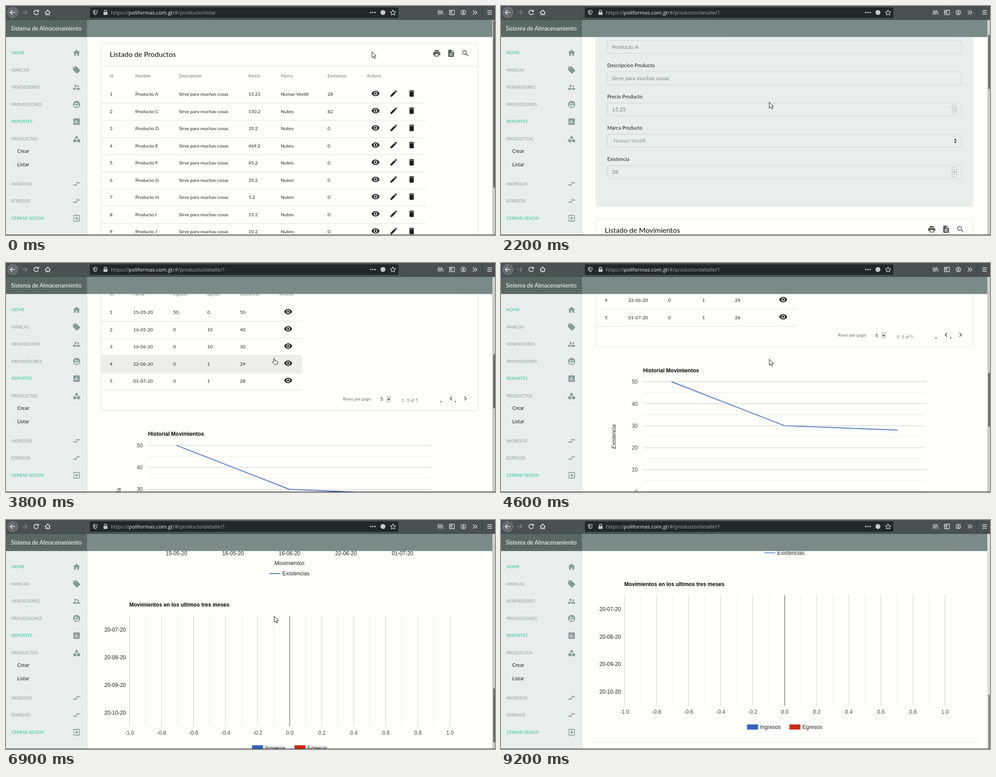
These frames come from a looping animation (1091 px wide and 513 px high, 9300 ms). An HTML page:

```html
<!DOCTYPE html>
<html lang="es">
<head>
<meta charset="utf-8">
<title>Sistema de Almacenamiento</title>
<style>
  html, body { margin: 0; width: 100%; height: 100%; overflow: hidden; background: #fffffb; }
  svg { display: block; width: 100vw; height: 100vh; font-family: Lato, sans-serif; }
  .ui { font-family: "Open Sans", sans-serif; }
  .chart { font-family: "Liberation Sans", Arial, sans-serif; }
</style>
</head>
<body>
<svg id="stage" viewBox="0 0 1091 513" preserveAspectRatio="none"></svg>
<script>
const LOOP = 9300, STEP = 100;
const INK = '#1d2120', MUTE = '#8c9c98', TEAL = '#2fc29b', FORM = '#e9eeec', EDGE = '#dadcd9';
const BLUE = '#3864bf', RED = '#cc2a14';

const ICON = {
  home: 'M10 20v-6h4v6h5v-8h3L12 3 2 12h3v8z',
  tag: 'M21.41 11.58l-9-9C12.05 2.22 11.55 2 11 2H4c-1.1 0-2 .9-2 2v7c0 .55.22 1.05.59 1.42l9 9c.36.36.86.58 1.41.58.55 0 1.05-.22 1.41-.59l7-7c.37-.36.59-.86.59-1.41 0-.55-.23-1.06-.59-1.42zM5.5 7C4.67 7 4 6.33 4 5.5S4.67 4 5.5 4 7 4.67 7 5.5 6.33 7 5.5 7z',
  people: 'M16.5 12a2.5 2.5 0 1 0 0-5a2.5 2.5 0 0 0 0 5zM9 11a3 3 0 1 0 0-6a3 3 0 0 0 0 6zm7.5 3c-1.83 0-5.5.92-5.5 2.75V19h11v-2.25c0-1.83-3.67-2.75-5.5-2.75zM9 13c-2.33 0-7 1.17-7 3.5V19h7v-2.25c0-.85.33-2.34 2.37-3.47C10.5 13.1 9.66 13 9 13z',
  group: 'M12 2a10 10 0 1 0 0 20a10 10 0 0 0 0-20zm3.6 6.34a1.93 1.93 0 1 1 0 3.86a1.93 1.93 0 0 1 0-3.86zm-6-1.58a2.36 2.36 0 1 1 0 4.72a2.36 2.36 0 0 1 0-4.72zm0 9.13v3.75c-2.4-.75-4.3-2.6-5.14-4.96 1.05-1.12 3.67-1.69 5.14-1.69.53 0 1.2.08 1.9.22-1.64.87-1.9 2.02-1.9 2.68zM12 20l-.8-.04v-4.07c0-1.42 2.94-2.13 4.4-2.13 1.07 0 2.92.39 3.84 1.15C18.27 17.88 15.38 20 12 20z',
  bars: 'M19 3H5c-1.1 0-2 .9-2 2v14c0 1.1.9 2 2 2h14c1.1 0 2-.9 2-2V5c0-1.1-.9-2-2-2zM9 17H7v-7h2v7zm4 0h-2V7h2v10zm4 0h-2v-4h2v4z',
  shapes: 'M12 2l-5.5 9h11zM17.5 13a4.5 4.5 0 1 0 0 9a4.5 4.5 0 0 0 0-9zM3 13.5h8v8H3z',
  swap: 'M9.01 14H2v2h7.01v3L13 15l-3.99-4v3zm5.98-1v-3H22V8h-7.01V5L11 9l3.99 4z',
  exit: 'M10.09 15.59L11.5 17l5-5-5-5-1.41 1.41L12.67 11H3v2h9.67l-2.58 2.59zM19 3H5c-1.11 0-2 .9-2 2v4h2V5h14v14H5v-4H3v4c0 1.1.89 2 2 2h14c1.1 0 2-.9 2-2V5c0-1.1-.9-2-2-2z',
  eye: 'M12 4.5C7 4.5 2.73 7.61 1 12c1.73 4.39 6 7.5 11 7.5s9.27-3.11 11-7.5c-1.73-4.39-6-7.5-11-7.5zM12 17a5 5 0 1 1 0-10a5 5 0 0 1 0 10zm0-8a3 3 0 1 0 0 6a3 3 0 0 0 0-6z',
  pen: 'M3 17.25V21h3.75L17.81 9.94l-3.75-3.75L3 17.25zM20.71 7.04c.39-.39.39-1.02 0-1.41l-2.34-2.34c-.39-.39-1.02-.39-1.41 0l-1.83 1.83 3.75 3.75 1.83-1.83z',
  bin: 'M6 19c0 1.1.9 2 2 2h8c1.1 0 2-.9 2-2V7H6v12zM19 4h-3.5l-1-1h-5l-1 1H5v2h14V4z',
  print: 'M19 8H5c-1.66 0-3 1.34-3 3v6h4v4h12v-4h4v-6c0-1.66-1.34-3-3-3zm-3 11H8v-5h8v5zm3-7a1 1 0 1 1 0-2a1 1 0 0 1 0 2zm-1-9H6v4h12V3z',
  doc: 'M14 2H6c-1.1 0-2 .9-2 2v16c0 1.1.9 2 2 2h12c1.1 0 2-.9 2-2V8l-6-6zm2 16H8v-2h8v2zm0-4H8v-2h8v2zm-3-5V3.5L18.5 9H13z',
  find: 'M15.5 14h-.79l-.28-.27A6.5 6.5 0 1 0 13.73 14.43l.27.28v.79l5 4.99L20.49 19l-4.99-5zm-6 0a4.5 4.5 0 1 1 0-9a4.5 4.5 0 0 1 0 9z',
  prev: 'M15.41 7.41L14 6l-6 6 6 6 1.41-1.41L10.83 12z',
  next: 'M10 6L8.59 7.41 13.17 12l-4.58 4.59L10 18l6-6z'
};

// x is the text edge, cy its optical middle
const text = (x, cy, s, size, fill = INK, extra = '') =>
  `<text x="${x}" y="${cy + size * .36}" font-size="${size}" fill="${fill}" ${extra}>${s}</text>`;
const rect = (x, y, w, h, fill, extra = '') =>
  `<rect x="${x}" y="${y}" width="${w}" height="${h}" fill="${fill}" ${extra}/>`;
const line = (x1, y1, x2, y2, c, w = 1) =>
  `<line x1="${x1}" y1="${y1}" x2="${x2}" y2="${y2}" stroke="${c}" stroke-width="${w}"/>`;
const icon = (name, cx, cy, fill = INK) =>
  `<path transform="translate(${cx - 9.6} ${cy - 9.6}) scale(.8)" fill="${fill}" d="${ICON[name]}"/>`;
const stroke = (d, c = '#d6d9d9', w = 1.5) =>
  `<path d="${d}" fill="none" stroke="${c}" stroke-width="${w}" stroke-linejoin="round"/>`;
const range = n => [...Array(n).keys()];
const MID = 'text-anchor="middle"', END = 'text-anchor="end"';

function toolbar() {
  const glyph = '#d6d9d9';
  return rect(0, 0, 1091, 31, '#4b5052') + rect(0, 30, 1091, 1, '#3c4143') +
    rect(187, 3, 688.5, 23.5, '#222729', 'rx="2"') +
    rect(56, 3, 23, 23, '#686d6f', 'rx="2" id="reload" visibility="hidden"') +
    `<circle cx="15" cy="14.5" r="11.5" fill="#64696b" stroke="#8b8f91"/>` +
    stroke('M20.5 14.5H10M14.5 9.5l-5 5 5 5', '#eceeee', 1.7) +
    stroke('M36 14.5h10.5M42 9.5l5 5-5 5', '#83888a', 1.6) +
    stroke('M71.3 11.2a5 5 0 1 0 .9 4.6M72.6 8.5v4h-4', '#e4e6e6', 1.7) +
    stroke('M87 15l6-6 6 6M89 14v5.5h8V14M93 19v-3', '#e4e6e6', 1.7) +
    stroke('M199 9.3l4.5 1.5c0 4.5-1.5 7.500-4.500 8.900c-3-1.400-4.500-4.400-4.500-8.900z', '#c3c6c7', 1.4) +
    `<path d="M199 11.300v6.300c-1.500-1.200-2.500-3-2.600-5.500z" fill="#c3c6c7"/>` +
    rect(217.5, 13.5, 9, 6.5, '#c3c6c7', 'rx="1"') + stroke('M219.300 14v-2a2.700 2.700 0 0 1 5.400 0v2', '#c3c6c7') +
    [813.5, 818.5, 823.5].map(x => `<circle cx="${x}" cy="14.5" r="1.6" fill="${glyph}"/>`).join('') +
    `<circle cx="841" cy="14.5" r="5.5" fill="#c6c9ca"/>` +
    stroke('M863.500 8.800l1.800 3.900 4.200.5-3.100 2.900.8 4.200-3.700-2.100-3.700 2.100.8-4.200-3.100-2.900 4.200-.5z', glyph, 1.3) +
    stroke('M964.500 9.500v10M967.500 9.500v10M970.500 9.500v10M972.500 10l3 9.500', glyph) +
    stroke('M989.500 9.500h11v10h-11zM994.500 9.500v10M990.500 12.500h3M990.500 15h3', glyph, 1.4) +
    `<circle cx="1020.500" cy="14.500" r="5.300" fill="none" stroke="${glyph}" stroke-width="1.300"/>` +
    `<circle cx="1020.500" cy="13" r="2" fill="${glyph}"/><path d="M1017 17.800a3.600 2.600 0 0 1 7 0z" fill="${glyph}"/>` +
    stroke('M1041.500 10l4.500 4.500-4.500 4.500M1046.500 10l4.500 4.500-4.500 4.500', glyph, 1.6) +
    line(1062.5, 0, 1062.5, 29, '#35393b') +
    stroke('M1074 10.500h10M1074 14.500h10M1074 18.500h10', '#e4e6e6', 1.6) +
    `<text class="ui" x="234" y="18.500" font-size="11.600" fill="#a4a9ab">https://<tspan fill="#f4f6f6">poliformas.com.gt</tspan>/#/producto/<tspan id="page"></tspan></text>`;
}

function sidebar() {
  const items = [
    ['HOME', 105, 'home', 1], ['MARCAS', 143.5, 'tag'], ['VENDEDORES', 182, 'people'],
    ['PROVEEDORES', 220.5, 'group'], ['REPORTES', 259, 'bars', 1], ['PRODUCTOS', 297.5, 'shapes'],
    ['INGRESOS', 398.5, 'swap'], ['EGRESOS', 437, 'swap'], ['CERRAR SESION', 475.5, 'exit', 1]
  ];
  return rect(0, 69, 180, 444, FORM) + line(180.5, 69, 180.5, 513, '#cfd6d3') +
    rect(0, 31, 180, 38.5, '#5a6863') + rect(180, 31, 905, 38.5, '#798a87') +
    line(180.5, 31, 180.5, 69.5, '#65746f') +
    text(11, 50, 'Sistema de Almacenamiento', 12.8, '#fff') +
    items.map(([s, y, ic, on]) => text(12, y, s, 9.6, on ? TEAL : MUTE) + icon(ic, 157.5, y, '#899995')).join('') +
    text(25, 325, 'Crear', 11.2) + text(25, 354.5, 'Listar', 11.2);
}

function card(y, h, title) {
  return rect(212, y, 841, h, 'none', `stroke="${EDGE}" rx="3.500"`) +
    text(231.5, y + 25, title, 16, '#0c0f0e') + line(212, y + 51.5, 1053, y + 51.5, EDGE) +
    ['print', 'doc', 'find'].map((n, i) => icon(n, 961 + 32 * i, y + 23, '#565b59')).join('');
}

function table(y, cols, heads, rows, right, icons, id) {
  const head = heads.map((h, i) => text(cols[i], y, h, 9.6, '#6c7270')).join('');
  return rect(212.5, y + 21.5, right - 212.5, 38.5, '#edeeea', `id="${id}" visibility="hidden"`) + head +
    rows.map((r, i) => {
      const cy = y + 40.5 + 38.5 * i;
      return r.map((c, j) => text(cols[j], cy, c, 10.4)).join('') +
        icons.map(([n, x]) => icon(n, x, cy - 1.5)).join('') +
        line(212, cy + 20, right, cy + 20, EDGE);
    }).join('');
}

function listPage() {
  const prices = ['15.23', '150.2', '35.2', '469.2', '45.2', '35.2', '5.2', '15.2', '10.2'];
  const rows = prices.map((p, i) => [i + 1, 'Producto ' + 'ACDEFGHIJ'[i], 'Sirve para muchas cosas', p,
    i ? 'Nubro' : 'Numar-Vestill', [28, 82][i] || 0]);
  return card(83, 560, 'Listado de Productos') +
    table(157, [231.5, 288.5, 386, 541, 613, 717.5, 805],
      ['Id', 'Nombre', 'Descripcion', 'Precio', 'Marca', 'Existencia', 'Actions'], rows, 936,
      [['eye', 824.5], ['pen', 865], ['bin', 905]], 'hoverA');
}

function form() {
  const fields = [['Nombre Producto', 'Producto A'], ['Descripcion Producto', 'Sirve para muchas cosas'],
    ['Precio Producto', '15.23', 'num'], ['Marca Producto', 'Numar-Vestill', 'sel'], ['Existencia', '28', 'num']];
  const spin = y => [0, 10.5].map((d, i) =>
    rect(1006.5, y - 10 + d, 10, 9.5, '#eef1ef', 'rx="2" stroke="#a9b1ae" stroke-width=".900"') +
    stroke(i ? `M1009.500 ${y + 4}l2 2 2-2` : `M1009.500 ${y - 4}l2-2 2 2`, '#6d7673', 1)).join('');
  return rect(211.5, 82.5, 842, 481, FORM, 'rx="4"') +
    text(566, 144, 'Detalle Producto', 18) + line(565.5, 136, 565.5, 154, '#222') +
    fields.map(([label, val, kind], i) => {
      const y = 204.5 + 70.1 * i;
      return text(237, y - 29, label, 11.2) +
        rect(237.5, y - 14.5, 790, 29, 'none', 'rx="3.500" stroke="#c9d1ce"') +
        text(kind === 'sel' ? 251 : 247.5, y, val, 12, kind === 'sel' ? '#8d9996' : '#75827e') +
        (kind === 'num' ? spin(y) : kind === 'sel'
          ? `<path d="M1010.500 ${y - 1}l3-4 3 4zM1010.500 ${y + 1.5}l3 4 3-4z" fill="#343a38"/>` : '');
    }).join('');
}

function moves() {
  const rows = [[1, '15-05-20', 50, 0, 50], [2, '16-05-20', 0, 10, 40], [3, '16-06-20', 0, 10, 30],
    [4, '22-06-20', 0, 1, 29], [5, '01-07-20', 0, 1, 28]];
  const y = 898.5;
  return card(590, 334.5, 'Listado de Movimientos') +
    table(664, [231.5, 284, 373, 449, 522, 610],
      ['Id', 'Fecha', 'Ingreso', 'Egreso', 'Existencia', 'Actions'], rows, 660.5, [['eye', 629.5]], 'hoverB') +
    text(752, y, 'Rows per page:', 9.6, '#6c7270') + text(835, y, '5', 10.4, '#111') +
    rect(849.5, y - 6, 8.5, 13, '#dfe1df', 'stroke="#b9bdbb" stroke-width=".800"') +
    `<path d="M851.300 ${y - .5}h5l-2.500 3z" fill="#111"/>` +
    text(883, y + 3.5, '1 -5 of 5', 9.6, '#6c7270') +
    icon('prev', 993, y - 1, '#4c514f') + icon('next', 1025, y - 1, '#4c514f') +
    [970.5, 1003].map(x => `<circle cx="${x}" cy="${y + 6}" r="1.300" fill="#333"/>`).join('');
}

function charts() {
  const top = 1002.5, gap = 49.3, stock = [50, 40, 30, 29, 28];
  const dates = ['15-05-20', '16-05-20', '16-06-20', '22-06-20', '01-07-20'];
  const px = i => 380.3 + 126.1 * i, py = v => top + (50 - v) / 10 * gap;
  const t = (x, y, s, extra = '', fill = '#222') => text(x, y, s, 12, fill, extra);
  const bold = 'font-weight="bold"', it = 'font-style="italic"';
  let g = t(317, 977, 'Historial Movimientos', bold, '#000');
  range(10).forEach(i => { if (i % 2) g += line(317, top + gap * i / 2, 948, top + gap * i / 2, '#e9ebe8'); });
  range(6).forEach(i => {
    g += line(317, top + gap * i, 948, top + gap * i, i < 5 ? '#c8cbc8' : '#333') +
      t(305, top + gap * i, 50 - 10 * i, END, '#444');
  });
  g += `<polyline points="${stock.map((v, i) => px(i) + ',' + py(v)).join(' ')}" fill="none" stroke="${BLUE}" stroke-width="1.700"/>` +
    dates.map((d, i) => t(px(i), 1263, d, MID)).join('') +
    t(632.5, 1285.5, 'Movimientos', `${MID} ${it}`) +
    t(252, 1125.5, 'Existencia', `${MID} ${it} transform="rotate(-90 252 1125.500)"`) +
    line(587.5, 1308.5, 612, 1308.5, BLUE, 1.7) + t(616.5, 1308.5, 'Existencias');

  const y0 = 1403, y1 = 1651;
  g += t(275, 1378.5, 'Movimientos en los ultimos tres meses', bold, '#000');
  range(21).forEach(i => {
    const x = 275.5 + 35.75 * i;
    g += line(x, y0, x, y1, i === 10 ? '#333' : i % 2 ? '#e9ebe8' : '#c8cbc8');
    if (i % 2 === 0) g += t(x, 1665, ((i - 10) / 10).toFixed(1), MID, '#444');
  });
  ['07', '08', '09', '10'].forEach((m, i) => { g += t(267.5, 1434.5 + 61.8 * i, `20-${m}-20`, END); });
  g += rect(549, 1693, 24.5, 11.5, '#3562c4') + t(578, 1699, 'Ingresos') +
    rect(643.5, 1693, 24.5, 11.5, RED) + t(672.5, 1699, 'Egresos') + line(200, 1733.5, 1066, 1733.5, '#e3e5e2');
  return `<g class="chart">${g}</g>`;
}

const stage = document.getElementById('stage');
stage.innerHTML =
  `<defs><clipPath id="view"><rect x="180" y="69.500" width="905" height="443"/></clipPath></defs>` +
  rect(0, 0, 1091, 513, '#fffffb') +
  `<g clip-path="url(#view)"><g id="list">${listPage()}</g><g id="detail">${form()}${moves()}${charts()}</g></g>` +
  toolbar() + sidebar() +
  rect(1085, 31, 6, 482, '#c9ccca', 'id="track"') + rect(1087, 32, 4, 100, '#686d6b', 'id="thumb" rx="1"') +
  `<g id="status">${rect(0, 494, 250, 18, '#34383a', 'rx="2"')}<text class="ui" x="3" y="506.500" font-size="11" fill="#fff">https://poliformas.com.gt/#/producto/detalle/1</text></g>` +
  rect(0, 512, 1091, 1, '#2a2d2e') +
  `<g id="cursor"><path id="arrow" d="M.5.5v13.200l3-2.700 2.200 4.800 2.400-1-2.200-4.700h4z" fill="#fff" stroke="#111"/>
   <path id="hand" d="M.2 7.300V1.200q0-1.500 1.200-1.500t1.200 1.500v3.600l5 1q1.700.4 1.500 2.300l-.6 4.800h-6.300l-4.600-4.300q-.9-1.200.2-1.900.9-.4 2.400.6z" transform="translate(-1 -1)" fill="#fff" stroke="#111"/></g>`;

const el = Object.fromEntries([...stage.querySelectorAll('[id]')].map(n => [n.id, n]));
const show = (n, on) => n.setAttribute('visibility', on ? 'visible' : 'hidden');

// start, end, from, to, ease-out power
const SCROLL = [[2000, 2300, 0, 148.5, 1.3], [2400, 2800, 148.5, 445.5, 1.3], [3300, 3800, 445.5, 594, 1.8],
  [4100, 4700, 594, 742.5, 1.8], [5600, 6400, 742.5, 1039.5, 1.8], [6500, 7300, 1039.5, 1235, 2.07]];
// time, x, y
const PATH = [[300, 816, 102], [400, 816, 115], [500, 816, 115], [800, 826, 199], [1500, 826, 199],
  [2000, 598, 215], [8100, 598, 215], [8200, 594, 222], [8300, 555, 205], [8700, 160, 40], [8800, 85, 14], [8900, 64, 7]];

function scrollAt(t) {
  let y = 0;
  for (const [a, b, from, to, k] of SCROLL)
    if (t >= a) y = from + (to - from) * (1 - (1 - Math.min(1, (t - a) / (b - a))) ** k);
  return y;
}

function cursorAt(t) {
  const i = PATH.findIndex(p => p[0] > t);
  if (i === 0) return PATH[0].slice(1);
  if (i < 0) return PATH[PATH.length - 1].slice(1);
  const [a, x0, y0] = PATH[i - 1], [b, x1, y1] = PATH[i], p = (t - a) / (b - a);
  return [x0 + (x1 - x0) * p, y0 + (y1 - y0) * p];
}

function draw(now) {
  const t = Math.floor(now % LOOP / STEP) * STEP;
  const detail = t >= 1100, y = scrollAt(t), [cx, cy] = cursorAt(t);
  show(el.list, !detail);
  show(el.detail, detail);
  el.detail.setAttribute('transform', `translate(0 ${-y})`);
  el.page.textContent = detail ? 'detalle/1' : 'listar';

  const overA = t >= 800 && t < 1100, overB = t >= 3800 && t < 4200;
  show(el.hoverA, overA);
  show(el.hoverB, overB);
  el.hoverB.setAttribute('transform', 'translate(0 115.500)');
  show(el.cursor, t < 9000);
  el.cursor.setAttribute('transform', `translate(${cx} ${cy})`);
  el.arrow.style.display = overA || overB ? 'none' : '';
  el.hand.style.display = overA || overB ? '' : 'none';
  show(el.reload, t >= 8800 && t < 9000);

  el.status.setAttribute('opacity', !detail || t > 1300 ? 0 : [.8, .4, .05][(t - 1100) / STEP]);
  el.thumb.setAttribute('y', 32 + .2905 * y);
  el.thumb.setAttribute('height', !detail ? 375 : t < 1700 ? 229 : 121);
  el.thumb.setAttribute('fill', t >= 9200 ? '#8a8e8c' : '#686d6b');
  el.track.setAttribute('fill', t >= 9200 ? '#dcdfdd' : '#c9ccca');
}

const begin = performance.now();
function tick() {
  draw(performance.now() - begin);
  requestAnimationFrame(tick);
}
tick();
</script>
</body>
</html>
```
